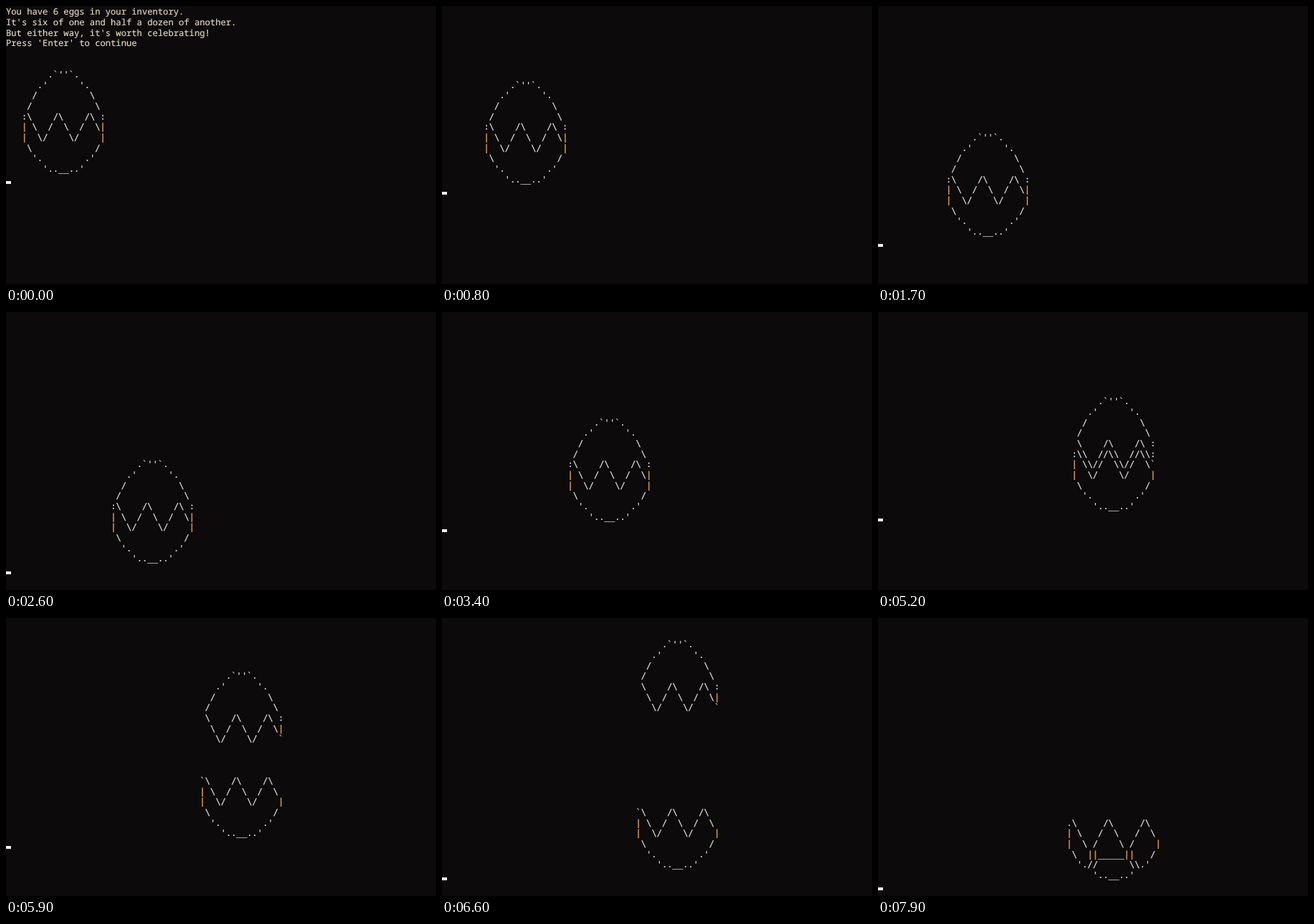
Write an HTML page that moves like this. It is 600 by 389 pixels and loops after 8000 ms.

```html
<!DOCTYPE html>
<html lang="en">
<head>
<meta charset="utf-8">
<title>Egg hunt console</title>
<style>
  html, body { margin: 0; width: 100%; height: 100%; overflow: hidden; background: #0c0a0b; }
  pre {
    position: absolute; left: 0; margin: 0;
    font: 12.15px/14.667px "DejaVu Sans Mono", monospace;
    font-variant-ligatures: none;
    text-rendering: geometricPrecision;
    -webkit-text-stroke: .2px;
    color: #dcdad6;
  }
  pre b { font-weight: normal; color: #d8944c; -webkit-text-stroke: .5px; }
  #screen { top: 1px; }
  #message { top: 1.2px; font-family: "Noto Sans Mono", monospace; font-size: 12.18px; color: #e2d6c4; }
  #cursor { position: absolute; left: 0; width: 7px; height: 4px; background: #f4f4f4; }
</style>
</head>
<body>
<pre id="message">You have 6 eggs in your inventory.
It's six of one and half a dozen of another.
But either way, it's worth celebrating!
Press 'Enter' to continue</pre>
<pre id="screen"></pre>
<div id="cursor"></div>

<script type="text/plain" id="art">
     .`''`.
   .'      '.
  /          \
 /            \
:\    /\    /\ :
| \  /  \  /  \|
|  \/    \/    |
 \            /
  '.        .'
    '..__..'
=
     .`''`.
   .'      '.
  /          \
 /            \
 \    /\    /\ :
  \  /  \  /  \|
   \/    \/    `
=
`\    /\    /\
| \  /  \  /  \
|  \/    \/    |
 \            /
  '.        .'
    '..__..'
=
.\     /\     /\
| \   /  \   /  \
|  \ /    \ /    |
 \  ||_____||   /
  './/      \\.'
     '..__..'
</script>

<script>
const LOOP = 8000, STEP = 100, ROWS = 27, COLS = 80, LINE = 14.667;
const byId = id => document.getElementById(id);
const message = byId('message'), screen = byId('screen'), cursor = byId('cursor');
const [egg, lid, cup, open] = byId('art').textContent
  .split('=').map(part => part.replace(/^\n|\n$/g, '').split('\n'));

// [time, column] along the bouncing path
const path = [[100, 3], [900, 9], [1800, 14], [2600, 20], [2700, 20],
              [3600, 26], [4200, 30], [4500, 33], [5000, 37]];
// [time, lid row, cup row] while the halves part
const parting = [[5200, 8, 13], [5400, 7, 14], [5600, 6, 14], [5900, 5, 15],
                 [6100, 4, 16], [6300, 3, 17], [6500, 2, 18]];
const SPLIT = 5200, LID_GONE = 6800, OPEN = 7900, HOME = 37;

function columnAt(t) {
  const i = path.findIndex(p => p[0] >= t);
  if (i < 0) return HOME;
  if (i === 0) return path[0][1];
  const [t0, c0] = path[i - 1], [t1, c1] = path[i];
  return Math.floor(c0 + (c1 - c0) * (t - t0) / (t1 - t0) + 1e-6);
}

// Diagonal bounce between the floor and the ceiling
function rowAt(col) {
  if (col <= 17) return col - 1;
  return col <= 31 ? 34 - col : col - 29;
}

function stamp(grid, lines, row, col) {
  lines.forEach((line, y) => [...line].forEach((ch, x) => {
    if (ch !== ' ' && grid[row + y]) grid[row + y][col + x] = ch;
  }));
}

function draw(t) {
  const grid = Array.from({ length: ROWS }, () => Array(COLS).fill(' '));
  let cursorRow = 25;
  if (t < SPLIT) {
    const col = columnAt(t), row = t < STEP ? 6 : rowAt(col);
    stamp(grid, egg, row, col);
    cursorRow = row + egg.length;
  } else if (t < LID_GONE) {
    const [, top, base] = parting.filter(p => p[0] <= t).pop();
    stamp(grid, cup, base, HOME);
    stamp(grid, lid, top, HOME);
    if (top === 8) stamp(grid, [':              :'], base, HOME);
    cursorRow = base + cup.length;
  } else if (t < OPEN) {
    stamp(grid, cup, 19, HOME);
    if (t >= 7300) stamp(grid, ['.'], 19, HOME);
    if (t >= 7600) stamp(grid, ['||_____||'], 22, HOME + 3);
  } else {
    stamp(grid, open, 19, HOME - 1);
  }
  message.style.visibility = t < STEP ? 'visible' : 'hidden';
  screen.innerHTML = grid.map(r => r.join('').trimEnd()).join('\n').replace(/\|+/g, '<b>$&</b>');
  cursor.style.top = Math.round((cursorRow + 1) * LINE) - 4 + 'px';
}

const start = performance.now();
let last = -1;
function tick() {
  const t = Math.floor((performance.now() - start) % LOOP / STEP) * STEP;
  if (t !== last) draw(last = t);
  requestAnimationFrame(tick);
}
tick();
</script>
</body>
</html>
```
